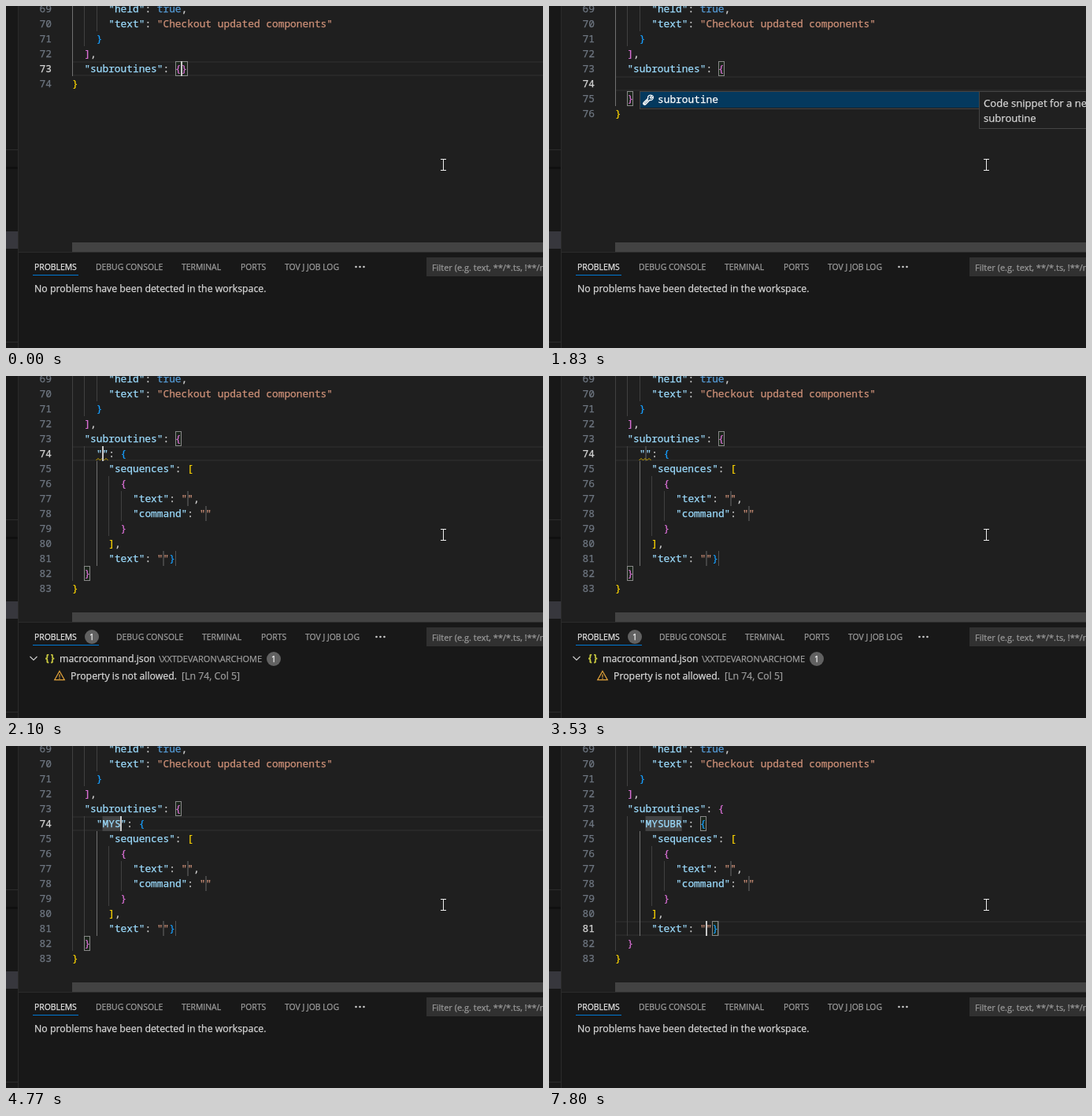
Write an HTML page that moves like this. It is 682x434 px and loops after 8000 ms.

```html
<!DOCTYPE html>
<html lang="en">
<head>
<meta charset="utf-8">
<title>JSON snippet editing</title>
<style>
html, body { margin: 0; width: 100%; height: 100%; overflow: hidden; background: #1f1f1f; }
svg { display: block; width: 100%; height: 100%; }
text { white-space: pre; font-family: "Open Sans", "Noto Sans", sans-serif; font-size: 12.3px; stroke-width: .25px; }
.code { font-family: "Noto Sans Mono", "DejaVu Sans Mono", monospace; font-size: 12.83px; }
</style>
</head>
<body>
<svg id="stage" viewBox="0 0 682 434"></svg>
<script>
const LOOP = 8000, LEFT = 84, CHAR = 7.7, LINE = 19, FIRST = 69;
const BRACKETS = ['#ffd700', '#da70d6', '#179fff'];
const BLINKS = [800, 1300, 1830, 2000, 2500, 3030, 3530, 3570, 4470, 4770,
  5570, 5800, 6300, 6800, 7300, 7800];
const TYPED = [[5070, 'MYSUBR'], [4900, 'MYSUB'], [4870, 'MYSU'], [4770, 'MYS'],
  [3970, 'MY'], [3570, 'M'], [0, '']];

const colX = col => LEFT + col * CHAR;
const rowY = row => 70 + (row - 73) * LINE;
const rect = (x, y, w, h, fill, extra = '') =>
  `<rect x="${x}" y="${y}" width="${w}" height="${h}" fill="${fill}" ${extra}/>`;
const frame = (x, y, w, h, fill, stroke) => rect(x, y, w, h, fill, `stroke="${stroke}"`);
const path = (d, stroke, extra = '') => `<path d="${d}" fill="none" stroke="${stroke}" ${extra}/>`;
const ink = color => `fill="${color}" stroke="${color}"`;
const text = (x, y, body, color, extra = '') =>
  `<text x="${x}" y="${y}" ${ink(color)} ${extra}>${body}</text>`;
const code = (x, y, body, color) => text(x, y, body, color, 'class="code"');
const span = (body, color) => `<tspan ${ink(color)}>${body}</tspan>`;
const sized = px => `style="font-size:${px}px"`;

function linesAt(t, word) {
  const head = ['      "held": true,', '      "text": "Checkout updated components"', '    }', '  ],'];
  if (t < 170) return [...head, '  "subroutines": {}', '}'];
  head.push('  "subroutines": {');
  if (t < 2000) return [...head, '  ', '  }', '}'];
  return [...head, `    "${word}": {`, '      "sequences": [', '        {',
    '          "text": "",', '          "command": ""', '        }', '      ],',
    '      "text": ""}', '  }', '}'];
}

function codeLines(lines, activeRow, activeGuide) {
  let depth = 3, out = '';
  const color = (token, rest) => {
    if (token[0] === '"') return rest.startsWith(':') ? '#9cdcfe' : '#ce9178';
    if (token === 'true') return '#569cd6';
    if ('{['.includes(token)) return BRACKETS[depth++ % 3];
    if ('}]'.includes(token)) return BRACKETS[--depth % 3];
    return '#d4d4d4';
  };
  lines.forEach((line, i) => {
    const row = FIRST + i, y = rowY(row), indent = line.search(/\S|$/);
    for (let col = 0; col < indent; col += 2)
      out += rect(Math.round(colX(col)), y, 1, LINE, activeGuide(col, row) ? '#707070' : '#404040');
    const body = line.slice(indent).replace(/"[^"]*"|true|[{}[\]]|[:, ]+/g,
      (token, at, all) => span(token, color(token, all.slice(at + token.length))));
    out += code(42.6, y + 14, row, row === activeRow ? '#d4d4d4' : '#6e7681');
    out += code(colX(indent), y + 14, body, '#d4d4d4');
  });
  return out;
}

const bracketBox = (row, col) =>
  frame(Math.round(colX(col)) + .5, rowY(row) + .5, 7, 18, 'rgba(0,100,0,.1)', '#888');

function matchedBrackets(t, word) {
  if (t < 170) return bracketBox(73, 17) + bracketBox(73, 18);
  if (t < 300) return '';
  if (t < 2000) return bracketBox(73, 17) + bracketBox(75, 2);
  if (t < 5870) return bracketBox(73, 17) + bracketBox(82, 2);
  return bracketBox(74, word.length + 8) + bracketBox(81, 16);
}

function placeholders(word) {
  const mark = (row, col) => rect(Math.floor(colX(col)), rowY(row), 2, LINE, '#444');
  return mark(77, 19) + mark(78, 22) + mark(81, 15) +
    rect(215, rowY(81), 1, LINE, '#525252') +
    (word ? rect(colX(5), rowY(74), word.length * CHAR, LINE, '#424344') : mark(74, 5));
}

const popup = (x, width, count) =>
  frame(x + .5, 108.5, width, count * LINE + 3, '#202020', '#454545') +
  rect(x + 1, 109, width - 1, 20, '#04395e');

function snippetPopup(t) {
  const wrench = path('M120.5 124.5l5.5-5.5M131 113.5l-2.6 2.6 1.2 1.3 2.6-2.4c.8 3-1.6 5.2-4.2 4.3l-5.4 5.6' +
    'c-1.8 1.3-3.8-.6-2.5-2.3l5.6-5.4c-.9-2.8 2-5.1 5.3-3.7z', '#fff', 'stroke-width="1.3"');
  const docs = frame(546.5, 108.5, 140, 47, '#202020', '#454545') +
    text(552, 128, 'Code snippet for a new', '#d8d8d8', sized(13.1)) +
    text(552, 147, 'subroutine', '#d8d8d8', sized(13.1));
  return popup(115, 431, 1) + wrench + code(138, 123, 'subroutine', '#fff') + (t >= 800 ? docs : '');
}

function wordPopup() {
  return popup(130, 431, 4) + ['MAIS', 'MR', 'maxSimultaneousExecution', 'minValues'].map((word, i) => {
    const y = 123 + i * LINE, color = i ? '#d4d4d4' : '#fff';
    return text(133.5, y - 1, 'abc', color, 'font-weight="600" style="font-size:8.6px"') +
      code(153, y, span(word[0], '#2aaaff') + word.slice(1), color);
  }).join('');
}

const badge = (x, y) => `<circle cx="${x}" cy="${y}" r="9" fill="#616161"/>` +
  text(x, y + 4, '1', '#f8f8f8', `text-anchor="middle" ${sized(10.4)}`);

function panel(warned) {
  const shift = warned ? 26 : 0;
  const tab = (x, label, color = '#9d9d9d') => text(x, 335, label, color, sized(10.4));
  let out = rect(16, 312, 666, 122, '#181818') + rect(16, 312, 666, 1, '#2b2b2b') +
    tab(36, 'PROBLEMS', '#e7e7e7') + rect(34, 341, warned ? 84 : 58, 1, '#0078d4') +
    tab(114 + shift, 'DEBUG CONSOLE') + tab(223 + shift, 'TERMINAL') +
    tab(298 + shift, 'PORTS') + tab(354 + shift, 'TOV J JOB LOG');
  for (const x of [444.5, 449.5, 454.5])
    out += `<circle cx="${x + shift}" cy="331" r="1.3" fill="#ccc"/>`;
  out += rect(534, 319, 148, 24, '#313131') +
    text(541, 336, 'Filter (e.g. text, **/*.ts, !**/node_modules/**)', '#989898', sized(11));
  if (!warned) return out + text(36, 363, 'No problems have been detected in the workspace.', '#d8d8d8');
  return out + badge(109, 331) + badge(340, 359) +
    path('M30.5 356l4.5 4.5 4.5-4.5', '#ccc', 'stroke-width="1.2"') +
    text(50, 362, '{\u2009}', '#cbcb41', 'font-weight="700" style="font-size:11.5px"') +
    text(68, 363, 'macrocommand.json', '#d8d8d8') +
    text(194, 363, '\\XXTDEVARON\\ARCHOME', '#9d9d9d', sized(11)) +
    path('M68 374.5l6.3 11.2h-12.6zM68 378.5v3.8M68 383v1.4', '#e2a33b', 'stroke-width="1.2"') +
    text(82, 385, 'Property is not allowed.', '#d8d8d8') +
    text(223, 385, '[Ln 74, Col 5]', '#9d9d9d');
}

function sidebar() {
  return rect(0, 0, 15, 434, '#181818') + rect(15, 0, 1, 434, '#2b2b2b') +
    rect(0, 182, 15, 1, '#2b2b2b') + rect(0, 204, 15, 3, '#101010') +
    rect(0, 286, 15, 22, '#37373d') + rect(0, 426, 15, 1, '#2b2b2b');
}

const pointer = () => path('M552 194.5h7M555.5 195v13M552 208.5h7', '#eee');

function scene(t) {
  const word = TYPED.find(([start]) => t >= start)[1];
  const snippet = t >= 2000, warned = t >= 2100 && t < 3700;
  const activeRow = t < 170 ? 73 : t < 5800 ? 74 : 81;
  const caretCol = t < 170 ? 18 : t < 2000 ? 4 : t < 5800 ? 5 + word.length : 15;
  const caretOn = BLINKS.filter(time => time <= t).length % 2 === 0;
  const activeGuide = (col, row) => snippet ? col === 4 && row > 74 : col === 0;
  const top = rowY(activeRow);

  let out = rect(0, 0, 682, 434, '#1f1f1f') +
    rect(LEFT, top, 598, 2, '#282828') + rect(LEFT, top + 17, 598, 2, '#282828');
  if (snippet) out += placeholders(word);
  out += matchedBrackets(t, word) + codeLines(linesAt(t, word), activeRow, activeGuide);
  if (warned) out += path('M114.5 107l2.5-2.5 2.5 2.5 2.5-2.5 2.5 2.5 2.5-2.5 2.5 2.5', '#cca700');
  if (caretOn) out += rect(Math.floor(colX(caretCol)), top, 2, LINE, '#c8c8c8');
  out += rect(LEFT, 300, 598, 12, '#434343') + panel(warned) + sidebar();
  if (t >= 700 && t < 2000) out += snippetPopup(t);
  if (t >= 3630 && t < 3970) out += wordPopup();
  return out + pointer();
}

const stage = document.getElementById('stage');
const begin = performance.now();
let shown = '';
function draw() {
  const next = scene((performance.now() - begin) % LOOP);
  if (next !== shown) stage.innerHTML = shown = next;
  requestAnimationFrame(draw);
}
draw();
</script>
</body>
</html>
```
